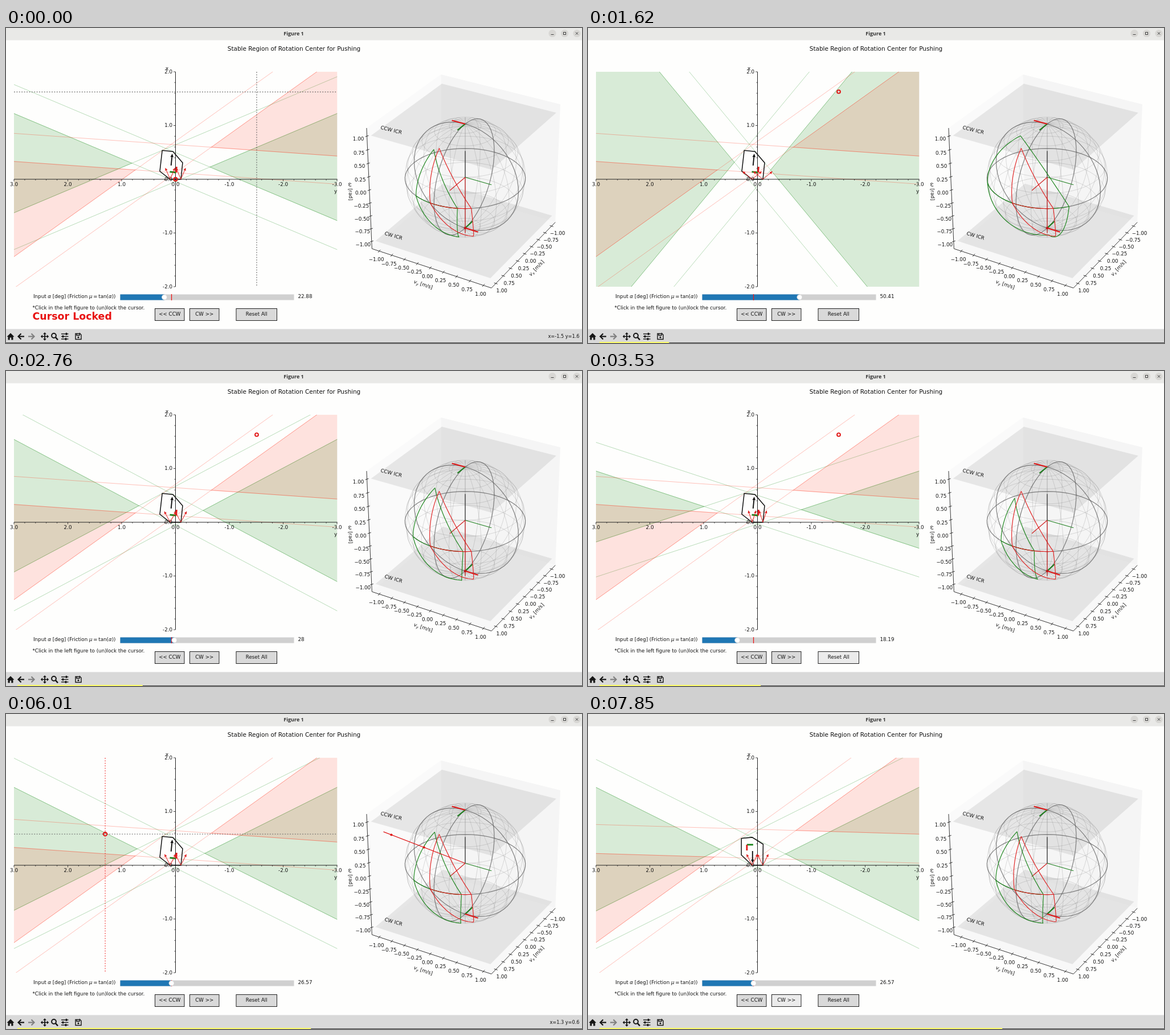
An HTML page with a canvas for the animation above (8 s loop, 1011 by 554 pixels).

```html
<!DOCTYPE html>
<html>
<head>
<meta charset="utf-8">
<style>
html, body { margin: 0; width: 100%; height: 100%; overflow: hidden; background: #fefefd; }
canvas { display: block; }
</style>
</head>
<body>
<canvas id="stage" width="1011" height="554"></canvas>
<script>
const g = document.getElementById('stage').getContext('2d');
const LOOP = 8000, RAD = Math.PI / 180;
const SANS = '"DejaVu Sans", sans-serif', SIZE = 8.73;
const OX = 297.5, OY = 266, UNIT = 94.5;
const PLOT = { l: 14, r: 581.5, t: 77, b: 455 };
const GREEN = '0,128,0', RED = '255,30,0';

// Pushed object, in the pose of its first contact edge
const HULL = [[288, 266], [307, 266], [310, 237], [293, 217.15], [274.2, 215.25], [270, 252]];
const MASS = [289.74, 241.97], FRAME = [298.5, 254], TILT = 5.77 * RAD;

// time, friction angle
const ANGLE = [[0, 22.88], [300, 22.88], [1090, 36.75], [1110, 37.5], [1330, 46.5], [1470, 46.5],
  [1740, 53.5], [2170, 40.5], [2290, 40.5], [2760, 28], [2900, 28], [3120, 52], [3420, 18.19], [3799, 18.19],
  [3800, 26.57]];
// time, pointer position
const POINTER = [[4220, 440, 452], [4650, 518, 215.5], [5010, 490, 192], [5110, 490, 192], [5480, 335, 185],
  [5860, 180, 213], [5920, 178, 212], [6010, 174, 211], [6690, 230, 330], [6770, 230, 330], [7180, 330, 452]];
const PROGRESS = [[300, 20], [1090, 95], [2170, 191], [3530, 303], [4650, 393], [6010, 535], [7850, 727], [8000, 742]];

function track(keys, t, col = 1) {
  if (t <= keys[0][0]) return keys[0][col];
  for (let i = 1; i < keys.length; i++) {
    const a = keys[i - 1], b = keys[i];
    if (t < b[0]) return a[col] + (b[col] - a[col]) * (t - a[0]) / (b[0] - a[0]);
  }
  return keys[keys.length - 1][col];
}

function line(pts, color, width = 1, dash = []) {
  g.beginPath();
  pts.forEach(p => g.lineTo(p[0], p[1]));
  g.strokeStyle = color; g.lineWidth = width; g.setLineDash(dash);
  g.stroke(); g.setLineDash([]);
}
function fill(pts, color) {
  g.beginPath();
  pts.forEach(p => g.lineTo(p[0], p[1]));
  g.fillStyle = color; g.fill();
}
function disc(x, y, r, color) {
  g.beginPath(); g.arc(x, y, r, 0, 7);
  g.fillStyle = color; g.fill();
}
function ring(x, y, r, color, width) {
  g.beginPath(); g.arc(x, y, r, 0, 7);
  g.strokeStyle = color; g.lineWidth = width; g.stroke();
}
function box(x, y, w, h, color) { g.fillStyle = color; g.fillRect(x, y, w, h); }
function text(s, x, y, align = 'center', font = SIZE + 'px ' + SANS, color = '#111') {
  g.font = font; g.textAlign = align; g.textBaseline = 'middle'; g.fillStyle = color;
  g.fillText(s, x, y);
}
// Mixed text: [string, italic?, scale, drop]
function runs(x, y, parts) {
  for (const [s, italic, scale = 1, drop = 0] of parts) {
    text(s, x, y + drop, 'left', (italic ? 'italic ' : '') + SIZE * scale + 'px ' + SANS);
    x += g.measureText(s).width;
  }
}
function turned(x, y, deg, draw) {
  g.save(); g.translate(x, y); g.rotate(deg * RAD); draw(); g.restore();
}
function arrow(x, y, dx, dy, color, width, head) {
  const len = Math.hypot(dx, dy), ux = dx / len, uy = dy / len, ex = x + dx, ey = y + dy;
  const bx = ex - ux * head, by = ey - uy * head, h = head * 0.45;
  line([[x, y], [bx, by]], color, width);
  fill([[ex, ey], [bx - uy * h, by + ux * h], [bx + uy * h, by - ux * h]], color);
}

// ---- geometry of the stable region ----

function pose(edge) {
  const a = HULL[edge], b = HULL[edge + 1], th = -Math.atan2(b[1] - a[1], b[0] - a[0]);
  const c = Math.cos(th), s = Math.sin(th), mx = (a[0] + b[0]) / 2, my = (a[1] + b[1]) / 2;
  const move = ([x, y]) => [OX + (x - mx) * c - (y - my) * s, OY + (x - mx) * s + (y - my) * c];
  return { hull: HULL.map(move), mass: move(MASS), frame: move(FRAME), dir: th + TILT, gyration: 895 + 22 * edge };
}
// A strip is two parallel lines: slope and heights where they cross the middle axis
function hullStrip(hull, slope) {
  const c = hull.map(([x, y]) => y - slope * (x - OX));
  return { slope, top: Math.min(...c), bot: Math.max(...c) };
}
function massStrip(end, { mass, gyration }) {
  const nx = mass[0] - end, ny = mass[1] - OY, k = gyration / (nx * nx + ny * ny), slope = -nx / ny;
  const at = (x, y) => y - slope * (x - OX);
  return { slope, top: at(mass[0] + nx * k, mass[1] + ny * k), bot: at(end + nx / 2, OY + ny / 2) };
}
function wedges(p, n) {
  const cross = (a, b) => {
    const u = (b - a) / (p.slope - n.slope);
    return [OX + u, a + p.slope * u];
  };
  return { p, n, left: cross(p.bot, n.top), right: cross(p.top, n.bot) };
}
const onLine = (slope, c, x) => [x, c + slope * (x - OX)];

function drawWedges({ p, n, left, right }, rgb, alpha) {
  const lw = [onLine(p.slope, p.bot, PLOT.l), left, onLine(n.slope, n.top, PLOT.l)];
  const rw = [onLine(p.slope, p.top, PLOT.r), right, onLine(n.slope, n.bot, PLOT.r)];
  for (const w of [lw, rw]) {
    fill(w, `rgba(${rgb},${alpha})`);
    line(w, `rgba(${rgb},.2)`);
  }
  for (const s of [p, n]) for (const c of [s.top, s.bot])
    line([onLine(s.slope, c, PLOT.l), onLine(s.slope, c, PLOT.r)], `rgba(${rgb},.28)`);
}

// ---- left plot ----

function drawAxes() {
  line([[PLOT.l, OY], [PLOT.r, OY]], '#222');
  line([[OX, PLOT.t], [OX, PLOT.b]], '#222');
  for (let i = -15; i <= 15; i++) {
    const len = i % 5 ? 2 : 3.5, x = OX - i * UNIT / 5, y = OY - i * UNIT / 5;
    line([[x, OY], [x, OY + len]], '#222', 0.8);
    if (Math.abs(i) <= 10) line([[OX, y], [OX - len, y]], '#222', 0.8);
  }
  for (let i = -3; i <= 3; i++) {
    text(i.toFixed(1), OX - i * UNIT, 275.5);
    if (Math.abs(i) < 3) text(i.toFixed(1), 292, OY - i * UNIT + 0.5, 'right');
  }
  text('x', 282.5, 71.5);
  text('y', 578.5, 288);
}

function drawObject(o, angle) {
  line([...o.hull, o.hull[0], o.hull[1]], '#111', 1.5);
  const ux = Math.sin(o.dir), uy = -Math.cos(o.dir), [fx, fy] = o.frame;
  line([[fx, fy], [fx + uy * 11, fy - ux * 11]], '#17831a', 2.8);
  line([[fx, fy], [fx + ux * 10, fy + uy * 10]], '#e01818', 2.8);
  arrow(o.mass[0], o.mass[1], ux * 21, uy * 21, '#111', 1.9, 6);
  for (const x of [OX - 9.45, OX + 9.45]) for (const s of [-1, 1])
    arrow(x, OY, s * 22 * Math.sin(angle), -22 * Math.cos(angle), '#e02020', 1, 5);
}

function drawPlot(green, red, object, angle, t, pointer) {
  g.save();
  g.beginPath(); g.rect(PLOT.l, PLOT.t, PLOT.r - PLOT.l, PLOT.b - PLOT.t); g.clip();
  drawWedges(green, GREEN, 0.15);
  drawWedges(red, RED, 0.12);
  g.restore();
  drawAxes();
  drawObject(object, angle);
  const cross = (x, y, vertical, horizontal) => {
    line([[x, PLOT.t], [x, PLOT.b]], vertical, 1, [2, 2.4]);
    line([[PLOT.l, y], [PLOT.r, y]], horizontal, 1, [2, 2.4]);
  };
  if (t < 300) {
    cross(440, 112.5, '#555', '#555');
    ring(OX, OY, 3, '#e01010', 2);
  } else if (t < 3800) ring(440, 112, 2.9, '#e01010', 1.9);
  if (pointer) {
    const [x, y] = pointer, blue = x > OX;
    cross(x, y, blue ? '#2222ff' : '#f02020', blue ? '#2222ff' : '#666');
    ring(x, y, 3.2, blue ? '#1010e0' : '#e01010', 1.9);
  }
}

// ---- right plot ----

function proj(x, y, z) {
  const s = 105.6 / (1 - 0.048 * (0.75 * x + 0.433 * y + 0.5 * z));
  return [806 + s * (0.866 * y - 0.5 * x), 262.5 + s * (0.433 * x + 0.25 * y - 0.866 * z)];
}
const P = v => proj(v[0], v[1], v[2]);
const scaled = (v, k) => v.map(c => c * k);
const unit = v => scaled(v, 1 / Math.hypot(...v));

function arc(a, b, color, width) {
  const u = unit(a), v = unit(b), pts = [];
  for (let i = 0; i <= 24; i++) pts.push(P(unit(u.map((c, j) => c + (v[j] - c) * i / 24))));
  line(pts, color, width);
}
function circle(at, color, width) {
  const pts = [];
  for (let i = 0; i <= 60; i++) pts.push(P(at(i * 6 * RAD)));
  line(pts, color, width);
}
// Velocity direction for a rotation center in the left plot
function twist([px, py], w) {
  return [w * (OX - px) / UNIT, -w * (OY - py) / UNIT, w];
}
function drawCone({ p, n, left, right }, color) {
  const top = twist(left, 1), low = twist(right, -1), a = [1, -p.slope, 0], b = [1, -n.slope, 0];
  for (const [u, v] of [[top, a], [a, low], [low, b], [b, top], [a, b]]) arc(u, v, color, 1.15);
}

function drawCage() {
  const A = 1.146, H = 1.1;
  fill([[A, -A, -A], [-A, -A, -A], [-A, -A, A], [A, -A, A]].map(P), '#fafafa');
  fill([[-A, A, -A], [-A, -A, -A], [-A, -A, A], [-A, A, A]].map(P), '#f5f5f5');
  fill([[A, -A, -A], [-A, -A, -A], [-A, A, -A], [A, A, -A]].map(P), '#f8f8f8');
  for (const z of [-1, 1])
    fill([[H, -H, z], [-H, -H, z], [-H, H, z], [H, H, z]].map(P), 'rgba(110,110,110,.14)');
  line([[A, -A, A], [A, -A, -A], [A, A, -A], [-A, A, -A]].map(P), '#222', 0.9);
  for (let i = -4; i <= 4; i++) {
    const v = i / 4, s = v.toFixed(2).replace('-', '\u2212');
    const mark = (p, dx, dy, lx, ly) => {
      line([[p[0] - dx, p[1] - dy], [p[0] + dx, p[1] + dy]], '#222', 0.9);
      text(s, p[0] + lx, p[1] + ly);
    };
    mark(proj(A, -A, v), 3, -1, -15, 6);
    mark(proj(A, v, -A), -2, 2.4, -5, 15.7);
    mark(proj(v, A, -A), 3, 1, 10.4, 13.6);
  }
  turned(676, 180, 14, () => text('CCW ICR', 0, 0));
  turned(680, 366, 16, () => text('CW ICR', 0, 0));
  const axisName = sub => () => runs(-18, 0, [['v', 1], [sub, 1, 0.7, 2.5], [' [m/s]', 0]]);
  turned(733, 452, 18, axisName('y'));
  turned(932, 422, -47, axisName('x'));
  turned(604, 289, 88, () => runs(-17, 0, [['ω', 1], [' [rad]', 0]]));
}

function drawSphere() {
  const thin = 'rgba(110,110,110,.42)';
  for (let k = 0; k < 12; k++) {
    const c = Math.cos(k * 15 * RAD), s = Math.sin(k * 15 * RAD);
    circle(a => [Math.cos(a) * c, Math.cos(a) * s, Math.sin(a)], thin, 0.55);
    if (k) circle(a => [s * Math.cos(a), s * Math.sin(a), c], thin, 0.55);
  }
  const dark = 'rgba(90,90,90,.68)';
  circle(a => [Math.cos(a), Math.sin(a), 0], dark, 1.2);
  circle(a => [Math.cos(a), 0, Math.sin(a)], dark, 1.2);
  circle(a => [0, Math.cos(a), Math.sin(a)], dark, 1.2);
  const o = P([0, 0, 0]);
  line([o, proj(0.5, 0, 0)], '#d02020', 1.1);
  line([o, proj(0, 0.5, 0)], '#208020', 1.1);
  line([o, proj(0, 0, 0.5)], '#222', 1.1);
  for (const z of [1, -1]) {
    line([proj(0, 0, z), proj(z / 4, 0, z)], '#1a7d1a', 2.1);
    line([proj(0, 0, z), proj(0, -z / 4, z)], '#e01818', 2.1);
  }
}
function drawRay(v, color) {
  g.save();
  g.beginPath(); g.rect(590, 60, 421, 407); g.clip();
  line([P([0, 0, 0]), P(scaled(v, 1.1))], color, 1.2);
  for (const p of [P(unit(v)), P(v)]) disc(p[0], p[1], 2.1, color);
  g.restore();
}

// ---- window and controls ----

function drawWindow(t) {
  box(0, 0, 1011, 554, '#fefefd');
  box(0, 0, 1011, 21.5, '#e9e9e7');
  text('Figure 1', 505, 10.5, 'center', 'bold 9px "Open Sans", sans-serif', '#333');
  for (const x of [959, 980.5, 1002]) disc(x, 9.5, 6.6, '#d8d7d4');
  line([[956.5, 11.5], [961.5, 11.5]], '#444');
  g.strokeRect(978.5, 7.5, 4, 4);
  line([[999.8, 7.3], [1004.2, 11.7]], '#444');
  line([[1004.2, 7.3], [999.8, 11.7]], '#444');
  text('Stable Region of Rotation Center for Pushing', 505.5, 37, 'center', '10.48px ' + SANS);
  box(0, 529.5, 1011, 25, '#d9d9d9');
  drawIcons();
  const played = t < 300 ? 0 : track(PROGRESS, t);
  box(played, 553, 1011 - played, 1, '#444');
  if (played) box(20, 552, played - 20, 2, '#fbfb6a');
}

function drawIcons() {
  const ink = '#151515';
  fill([[1.5, 543], [8, 536.5], [14.5, 543], [12.5, 543], [12.5, 548.5], [9.3, 548.5], [9.3, 544.5],
    [6.7, 544.5], [6.7, 548.5], [3.5, 548.5], [3.5, 543]], ink);
  for (const [x, s, color] of [[26.5, 1, ink], [44.5, -1, '#808080']]) {
    line([[x + 5.5 * s, 542.5], [x - 4 * s, 542.5]], color, 2.2);
    line([[x, 537.5], [x - 5 * s, 542.5], [x, 547.5]], color, 2.2);
  }
  for (let k = 0; k < 4; k++) turned(68, 542.5, k * 90, () => {
    line([[0, 0], [5, 0]], ink, 1.7);
    fill([[7.2, 0], [4, -3], [4, 3]], ink);
  });
  ring(84, 541, 3.9, ink, 2);
  line([[87, 544], [91, 548.5]], ink, 2.6);
  [[538, 106], [542.5, 100], [547, 105]].forEach(([y, x]) => {
    line([[97, y], [109.5, y]], ink, 1.4);
    box(x - 1.2, y - 2, 2.4, 4, ink);
  });
  line([[130, 537.5], [122, 537.5], [122, 547.5], [132, 547.5], [132, 539.5], [129.5, 537], [129, 540.5],
    [124, 540.5], [124, 537.5]], ink, 1.4);
  disc(127, 544, 1.6, ink);
}

function drawControls(t, degrees) {
  const x = 200.5 + degrees * 305 / 90, init = 200.5 + 26.57 * 305 / 90;
  runs(48, 473, [['Input ', 0], ['α', 1], [' [deg] (Friction ', 0], ['μ', 1], ['\u2009=\u2009', 0], ['tan(', 0], ['α', 1], ['))', 0]]);
  box(200.5, 468.5, 305, 10, '#d0d0d0');
  box(200.5, 468.5, x - 200.5, 10, '#1f77b4');
  line([[init, 468], [init, 479]], '#f01818', 1.3);
  disc(x, 473.5, 4.5, '#fff');
  ring(x, 473.5, 4.5, '#d0d0d0', 0.8);
  text(String(+degrees.toFixed(2)), 512.5, 473, 'left');
  text('*Click in the left figure to (un)lock the cursor.', 46.5, 492.5, 'left');
  if (t < 300) text('Cursor Locked', 46.5, 508, 'left', 'bold 17.4px ' + SANS, '#e81010');
  const button = (bx, w, label, hover) => {
    box(bx, 493.5, w, 21, hover ? '#ebebeb' : '#d9d9d9');
    g.strokeStyle = '#222'; g.lineWidth = 1; g.strokeRect(bx, 493.5, w, 21);
    text(label, bx + w / 2, 503.5);
  };
  button(261.5, 51.5, '<< CCW');
  button(322.5, 51.5, 'CW >>', t >= 7180);
  button(404, 71.5, 'Reset All', t >= 3530 && t < 4220);
}

function draw(t) {
  const degrees = track(ANGLE, t), slope = Math.tan(degrees * RAD);
  const object = pose(t < 7320 ? 0 : t < 7620 ? 1 : t < 7850 ? 2 : 3);
  const green = wedges(hullStrip(object.hull, slope), hullStrip(object.hull, -slope));
  const red = wedges(massStrip(OX - 9.45, object), massStrip(OX + 9.45, object));
  const pointer = t >= 4220 && t < 7180 ? [track(POINTER, t), track(POINTER, t, 2)] : null;

  drawWindow(t);
  drawPlot(green, red, object, degrees * RAD, t, pointer);
  drawCage();
  drawSphere();
  drawCone(green, '#1c851c');
  drawCone(red, '#e02222');
  if (t < 3800) drawRay([0, 0, -1], '#c01818');
  if (pointer) {
    const blue = pointer[0] > OX;
    drawRay(twist(pointer, blue ? -1 : 1), blue ? '#2020d8' : '#e01818');
  }
  drawControls(t, degrees);

  const mouse = t < 300 ? [440, 112.5] : pointer;
  if (mouse) {
    const mx = (OX - mouse[0]) / UNIT, my = (OY - mouse[1]) / UNIT;
    text(`x=${mx.toFixed(1)} y=${my.toFixed(1)}`, 1006.5, 542.5, 'right', '8.2px ' + SANS);
  }
}

function tick() {
  draw(performance.now() % LOOP);
  requestAnimationFrame(tick);
}
tick();
</script>
</body>
</html>
```
